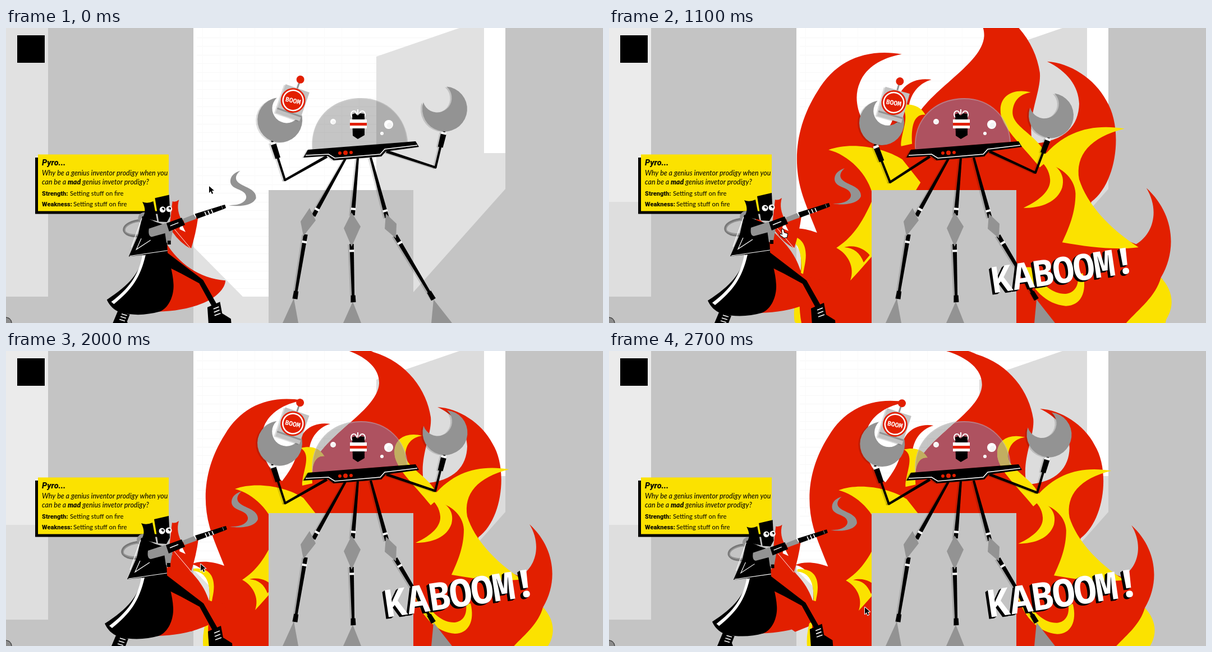
These frames come from a looping animation (1064 px wide and 526 px high, 2800 ms). An HTML page with a canvas:

```html
<!DOCTYPE html>
<html lang="en">
<head>
<meta charset="utf-8">
<title>Kaboom</title>
<style>
html, body { margin: 0; width: 100%; height: 100%; overflow: hidden; background: #c4c4c4; }
canvas { display: block; }
</style>
</head>
<body>
<canvas id="stage" width="1064" height="526"></canvas>
<script>
const ctx = document.getElementById('stage').getContext('2d');
const LOOP = 2800, STEP = 100;
const RED = '#e21f00', YELLOW = '#fbe200', GREY = '#c4c4c4', STEEL = '#939393';

function fill(d, color) {
  ctx.fillStyle = color;
  ctx.fill(new Path2D(d));
}
function line(d, width, color) {
  ctx.strokeStyle = color;
  ctx.lineWidth = width;
  ctx.stroke(new Path2D(d));
}
function rect(x, y, w, h, color) {
  ctx.fillStyle = color;
  ctx.fillRect(x, y, w, h);
}
function disc(x, y, r, color) {
  ctx.fillStyle = color;
  ctx.beginPath();
  ctx.arc(x, y, r, 0, 7);
  ctx.fill();
}
function text(str, x, y, font, color) {
  ctx.font = font;
  ctx.fillStyle = color;
  ctx.fillText(str, x, y);
}
function about(x, y, scale, draw) {
  ctx.save();
  ctx.translate(x, y);
  ctx.scale(scale, scale);
  ctx.translate(-x, -y);
  draw();
  ctx.restore();
}
function shade(on) {
  ctx.shadowColor = on ? 'rgba(0,0,0,.14)' : 'transparent';
  ctx.shadowOffsetX = -3;
  ctx.shadowOffsetY = 1;
}
const mix = (a, b, k) => a + (b - a) * k;

// Value at time t on a curve of [time, value] stops.
function track(t, stops, ease) {
  if (t <= stops[0][0]) return stops[0][1];
  for (let i = 1; i < stops.length; i++) {
    const [t0, a] = stops[i - 1], [t1, b] = stops[i];
    if (t <= t1) {
      let k = (t - t0) / (t1 - t0);
      if (ease) k = k * k * (3 - 2 * k);
      return mix(a, b, k);
    }
  }
  return stops[stops.length - 1][1];
}

const LIFT = [[0, .55], [400, 1], [900, 0], [1700, 0], [2300, 1], [2700, .32]];
const SWAY = [[0, .974], [300, 1], [2300, 1], [2700, .945]];
const BLAZE = [[600, 0], [700, .1], [800, .3], [900, .575], [1000, .88], [1100, 1.079],
  [1200, 1.07], [1300, 1.02], [1500, .997], [1600, 1], [2000, 1], [2300, 1.006], [2700, .994]];
const SHOUT = [[900, 0], [1000, .5], [1100, .95], [1200, 1.05], [1300, 1.02], [1400, 1]];
const CURSOR_X = [[0, 362], [350, 311], [900, 308], [1800, 308], [2300, 406], [2700, 456]];
const CURSOR_Y = [[0, 282], [350, 356], [900, 360], [1800, 360], [2300, 409], [2700, 457]];

const DOME = 'M546,217 C541,165 578,125 633,125 C680,125 713,160 716,203 Z';

function backdrop(t) {
  const late = t >= 800;
  rect(0, 0, 1064, 526, GREY);
  rect(0, 0, 75, 479, late ? '#dedede' : '#e1e1e1');
  if (late) rect(0, 0, 75, 310, '#ebebeb');
  rect(334, 0, 556, 526, '#fff');
  for (let y = 17; y < 480; y += 15.4) rect(340, Math.round(y), 512, 1, '#f7f7f7');
  for (let x = 350; x < 660; x += 31) rect(x, 0, 1, 289, '#fafafa');
  fill('M334,390 L422,479 H468 V526 H334 Z', '#e1e1e1');
  fill('M660,51 L808,0 H852 V223 H890 V526 H660 Z', late ? '#dcdcdc' : '#e1e1e1');
  fill('M890,287 L726,471 V526 H890 Z', GREY);
}

function fire() {
  fill('M529,88 C470,78 420,98 390,149 C356,202 348,260 363,314 C369,335 380,360 389,383 ' +
    'C365,374 345,374 330,380 C355,385 366,410 362,446 C352,415 335,395 288,356 V470 L330,500 ' +
    'L355,490 C350,510 356,530 360,620 H940 L965,526 C975,500 965,465 957,457 ' +
    'C985,410 978,350 933,309 C955,345 945,385 916,402 C860,380 836,350 842,332 ' +
    'C885,300 895,210 867,165 C848,128 806,102 769,100 C802,116 821,140 822,170 ' +
    'C821,205 800,232 745,236 C735,190 760,150 757,118 C750,70 715,20 655,2 ' +
    'C635,-8 615,-8 600,-4 C640,8 666,30 665,58 C662,105 575,145 548,200 L541,172 ' +
    'C545,150 560,135 578,130 C545,125 520,145 520,178 C515,200 505,215 492,232 ' +
    'C460,205 446,165 460,134 C470,110 495,94 529,88 Z', RED);
  // left side
  fill('M408,246 C445,232 500,242 530,262 L560,300 L500,400 C480,420 465,440 444,462 ' +
    'C452,440 440,418 421,408 C445,392 462,372 482,325 C474,285 440,254 408,246 Z', YELLOW);
  fill('M434,407 C452,402 468,410 476,420 L466,432 C460,416 450,408 434,407 Z', RED);
  fill('M334,388 C365,385 376,405 368,440 C362,475 355,500 366,545 L352,530 C347,500 362,470 363,442 C364,410 355,394 334,392 Z', YELLOW);
  fill('M525,173 C545,168 560,174 568,188 C550,186 544,205 546,236 L528,240 C526,220 547,185 525,173 Z', YELLOW);
  // right side
  fill('M742,151 C715,144 692,155 692,180 C691,207 725,235 757,275 L772,262 C755,220 711,210 712,183 C713,167 722,154 742,151 Z', YELLOW);
  fill('M897,211 C845,203 800,213 762,258 L758,268 C790,270 815,292 816,318 C816,350 805,375 794,399 ' +
    'C840,407 880,412 920,407 C870,375 835,335 822,295 C815,255 840,225 897,211 Z', YELLOW);
  fill('M756,262 C785,268 800,285 794,308 C786,332 760,342 730,342 C760,328 775,312 774,295 C773,280 765,270 756,262 Z', YELLOW);
  fill('M957,457 C974,475 982,500 966,526 L945,610 L880,560 C900,520 945,500 957,457 Z', YELLOW);
  fill('M828,450 C836,482 824,504 800,504 C768,502 742,475 730,440 H742 C760,470 780,485 800,484 C815,482 822,470 820,452 Z', YELLOW);
}

function limb(x0, y0, x1, y1, w0, w1, color = '#000') {
  const len = Math.hypot(x1 - x0, y1 - y0);
  const nx = (y0 - y1) / len / 2, ny = (x1 - x0) / len / 2;
  ctx.fillStyle = color;
  ctx.beginPath();
  ctx.moveTo(x0 + nx * w0, y0 + ny * w0);
  ctx.lineTo(x1 + nx * w1, y1 + ny * w1);
  ctx.lineTo(x1 - nx * w1, y1 - ny * w1);
  ctx.lineTo(x0 - nx * w0, y0 - ny * w0);
  ctx.fill();
}

function leg(hip, knee, shin, ankle, diamond, foot) {
  shade(true);
  limb(...hip, ...knee, 4, 7.5);
  limb(...shin, ...ankle, 7.5, 4.5);
  shade(false);
  const band = (a, b, k) => {
    const x = mix(a[0], b[0], k), y = mix(a[1], b[1], k);
    const len = Math.hypot(b[0] - a[0], b[1] - a[1]);
    limb(x, y, x + (b[0] - a[0]) / len * 4, y + (b[1] - a[1]) / len * 4, 8.5, 8.5, '#fff');
  };
  band(hip, knee, .87);
  band(shin, ankle, .1);
  fill(foot, STEEL);
  limb(mix(shin[0], ankle[0], .88), mix(shin[1], ankle[1], .88), ...ankle, 8, 9);
  fill(diamond, STEEL);
}

// Disc with a round bite taken out in direction dir.
function claw(x, y, dir) {
  const R = 40, r = 26, d = 24;
  const along = (d * d + R * R - r * r) / (2 * d);
  const h = Math.sqrt(R * R - along * along);
  const outer = Math.atan2(h, along), inner = Math.atan2(h, along - d);
  shade(true);
  ctx.fillStyle = STEEL;
  ctx.beginPath();
  ctx.arc(x, y, R, dir + outer, dir - outer + Math.PI * 2);
  ctx.arc(x + d * Math.cos(dir), y + d * Math.sin(dir), r, dir - inner, dir + inner, true);
  ctx.fill();
  shade(false);
}

function arm(sx, sy, ex, ey, wx, wy) {
  shade(true);
  limb(sx, sy, ex, ey, 5, 4);
  limb(ex, ey, wx, wy, 4, 4);
  disc(ex, ey, 2, '#000');
  const at = k => [mix(wx, ex, k), mix(wy, ey, k)];
  limb(...at(.05), ...at(.45), 10, 9);
  shade(false);
  limb(...at(.04), ...at(.1), 10, 10, '#fff');
}

function bomb(x, y, angle) {
  ctx.save();
  ctx.translate(x, y);
  ctx.rotate(angle);
  rect(-1.5, -34, 3, 14, STEEL);
  disc(0, -39.5, 7, RED);
  shade(true);
  rect(-22, -23, 45, 54, '#c2c2c2');
  shade(false);
  rect(-22, 21, 45, 3, STEEL);
  disc(0, 0, 22, RED);
  ctx.strokeStyle = '#fff';
  ctx.lineWidth = 2.5;
  ctx.beginPath();
  ctx.arc(0, 0, 18, 0, 7);
  ctx.stroke();
  ctx.textAlign = 'center';
  ctx.rotate(-.12);
  text('BOOM', 0, 4.5, '900 11.5px "Noto Sans Mono", monospace', '#fff');
  ctx.restore();
}

function pilot() {
  ctx.save();
  ctx.strokeStyle = '#fff';
  ctx.lineWidth = 2;
  for (const x of [619, 634]) {
    ctx.beginPath();
    ctx.ellipse(x + 1, 154, 5, 6, 0, 0, 7);
    ctx.stroke();
  }
  ctx.restore();
  fill('M617,154 L622,152 L627,156 L631,152 L639,153 V191 L627,198 L618,192 Z', '#000');
  rect(613, 163, 30, 16, '#fff');
  rect(613, 169, 30, 5, RED);
  line('M627,145 V153', 2, '#fff');
}

// Smoked glass: darkens what is behind and keeps a cool floor.
function glass() {
  ctx.save();
  ctx.globalCompositeOperation = 'multiply';
  fill(DOME, '#c5c5c5');
  ctx.globalCompositeOperation = 'lighten';
  fill(DOME, 'rgb(0,82,96)');
  ctx.restore();
  line('M546,215 C543,165 578,127 633,126 C680,126 713,160 715,203', 2, 'rgba(215,215,215,.3)');
}

function robot(p) {
  leg([605, 233], [548, 335], [534, 368], [515, 483],
    'M541,321 L552,343 L530,371 L525,345 Z', 'M513,482 L493,526 H521 Z');
  leg([627, 232], [618, 334], [616, 385], [619, 489],
    'M616,329 L632,354 L616,390 L602,357 Z', 'M618,488 L601,526 H633 Z');
  leg([650, 231], [679, 338], [694, 370], [762, 484],
    'M677,331 L696,349 L695,375 L675,358 Z', 'M762,484 L758,526 H795 Z');

  arm(572, 229, mix(501, 494, p), mix(275, 268, p), mix(474, 475, p), mix(207, 195, p));
  arm(678, 220, mix(760, 770, p), mix(258, 241, p), mix(784, 779, p), mix(194, 174, p));
  claw(mix(486, 490, p), mix(169, 160, p), -1.08 + .08 * p);
  claw(mix(788, 777, p), mix(156, 135, p), -2.1 - .12 * p);
  bomb(mix(507.5, 515, p), mix(133, 126, p), mix(.28, .38, p));

  glass();
  for (const [x, y, r] of [[583, 167, 5], [682, 172, 8], [670, 188, 3]]) {
    disc(x, y, r, '#fff');
    disc(x + r * .2, y + r * .2, r * .6, '#f3f3f3');
  }
  pilot();

  shade(true);
  fill('M538,217 L730,202 L736,212 L677,220 L669,229 L584,236 L573,228 L530,231 Z', '#000');
  shade(false);
  line('M534,227 L575,225 L586,232 L667,225 L675,216 L733,209', 1.6, '#fff');
  [[595, 223, 3], [605, 222.5, 4], [615, 222, 3]].forEach(l => disc(...l, RED));
}

function hero() {
  // smoke
  fill('M399,313 C420,314 432,306 431,297 C429,282 401,286 402,268 C403,258 411,253 420,250 ' +
    'C412,257 410,264 415,270 C424,280 450,282 449,300 C444,313 420,317 399,313 Z', STEEL);
  // hose and tank
  line('M254,342 C222,336 200,352 209,363 C217,373 240,371 257,366', 3.5, '#777');
  line('M251,343 C224,340 204,352 210,362 C218,369 240,368 255,364', 2, STEEL);
  fill('M233,337 Q234,327 245,326 L256,330 L262,345 L236,345 Z', STEEL);
  // cape
  fill('M285,383 C307,419 344,447 393,451 C393,465 375,484 350,493 C325,503 298,507 270,508 L260,430 Z', RED);
  fill('M290,346 L343,335 Q339,365 330,393 Q310,382 296,362 Z', RED);
  line('M298,355 L330,393', 1, '#fff');
  fill('M296,306 Q302,308 308,303 Q302,323 315,344 L291,350 Z', RED);
  fill('M311,344 L320,362 L309,357 Z', '#fff');
  // boots
  fill('M196,507 L218,513 L213,526 L222,550 H178 Z', '#000');
  line('M203,512 L213,515 M201,517 L211,520 M199,522 L209,525', 1.6, '#fff');
  fill('M284,398 L352,450 L377,494 L368,498 L345,456 L312,438 L292,428 Z', '#000');
  fill('M360,500 L383,490 L387,511 L403,521 L405,545 H363 Z', '#000');
  line('M371,503 L381,499 M372,509 L382,505 M373,515 L384,511', 1.8, '#fff');
  // coat
  fill('M243,402 C238,435 217,460 176,486 C181,497 189,505 200,509 C225,516 250,514 272,508 ' +
    'C289,502 299,479 298,458 C297,434 289,416 286,394 Z', '#000');
  fill('M247,404 C237,447 221,468 189,494 L184,490 C216,466 234,442 241,405 Z', '#fff');
  // torso and arms
  fill('M241,333 L266,344 L285,350 L287,399 L216,407 L233,368 Z', '#000');
  line('M240,337 L221,390 M239,374 L230,394 L256,377 M218,406 L287,396', 1.2, '#fff');
  fill('M241,307 Q250,311 261,306 L268,342 L241,336 Q250,324 241,307 Z', '#000');
  // head
  fill('M264,300 L290,294 L292,333 L286,344 L271,343 Z', '#000');
  for (const [x, y] of [[278, 321], [290, 320]]) {
    disc(x, y, 5.5, '#fff');
    disc(x + 1, y - 1, 2.3, '#000');
    disc(x, y, 1, '#fff');
  }
  // gun
  fill('M282,361 L297,357 L293,379 L285,382 Z', STEEL);
  rect(287, 378, 6, 7, '#000');
  fill('M253,356 L283,346 Q290,346 291,356 L288,363 L258,371 Q251,370 253,356 Z', STEEL);
  fill('M285,346 L313,336 L319,349 L290,361 Z', '#000');
  line('M292,351 L307,345', 1.5, '#fff');
  fill('M315,338 L335,330 L340,338 L318,346 Z', STEEL);
  fill('M337,329 L388,313 L392,312 L394,318 L390,320 L341,338 Z', '#000');
  line('M355,325 L358,332 M361,323 L364,330 M367,321 L370,328', 1.8, '#fff');
  line('M386,314 L388,320', 1, '#999');
}

function card() {
  const ink = '#111000';
  rect(52, 231, 233, 100.5, '#000');
  rect(57, 225.5, 233, 101, YELLOW);
  const body = '12.4px Lato, sans-serif', head = '900 11px Roboto, sans-serif';
  text('Pyro...', 64, 245, 'italic 900 14.5px Roboto, sans-serif', ink);
  text('Why be a genius inventor prodigy when you', 64, 263, 'italic 500 ' + body, ink);
  let x = 64;
  for (const [part, weight] of [['can be a ', 500], ['mad', 900], [' genius invetor prodigy?', 500]]) {
    text(part, x, 279, `italic ${weight} ${body}`, ink);
    x += ctx.measureText(part).width;
  }
  [['Strength:', 299, 114], ['Weakness:', 318, 120]].forEach(([label, y, tx]) => {
    text(label, 64, y, head, ink);
    text('Setting stuff on fire', tx, y, '500 11.3px Lato, sans-serif', ink);
  });
}

function shout() {
  ctx.save();
  ctx.translate(679, 475);
  ctx.rotate(-.145);
  ctx.letterSpacing = '-2.2px';
  const font = '900 68px "Noto Sans Mono", monospace';
  for (let i = 5; i >= 0; i--) text('KABOOM!', -i, i * .5, font, i ? '#000' : '#fff');
  ctx.restore();
}

function cursor(t) {
  ctx.save();
  ctx.translate(Math.round(track(t, CURSOR_X)), Math.round(track(t, CURSOR_Y)));
  ctx.lineJoin = 'round';
  const hand = t >= 300 && t < 1900;
  const d = hand
    ? 'M0,0 Q1,-2 3,0 L4,5 L10,7 L9,13 L4,14 L-3,9 L-2,7 L1,9 Z'
    : 'M0,0 V12 L3,9 L5,14 L7,13 L5,8 H9 Z';
  line(d, 2, hand ? '#000' : '#fff');
  fill(d, hand ? '#fff' : '#000');
  ctx.restore();
}

function draw(t) {
  backdrop(t);
  const blaze = track(t, BLAZE);
  if (blaze > 0) about(620, 610, blaze, fire);
  rect(468, 289, 258, 237, GREY);
  robot(track(t, LIFT, true));
  card();
  about(320, 425, track(t, SWAY, true), hero);
  const loud = track(t, SHOUT);
  if (loud > 0) about(802, 432, loud, shout);
  rect(20, 13, 49, 49, '#000');
  disc(0, 526, 9, '#8c8c8c');
  line('M0,516 Q9,517 10,526', 1.5, '#444');
  cursor(t);
}

const start = performance.now();
function tick() {
  const t = (performance.now() - start) % LOOP;
  draw(Math.floor(t / STEP) * STEP);
  requestAnimationFrame(tick);
}
tick();
</script>
</body>
</html>
```
